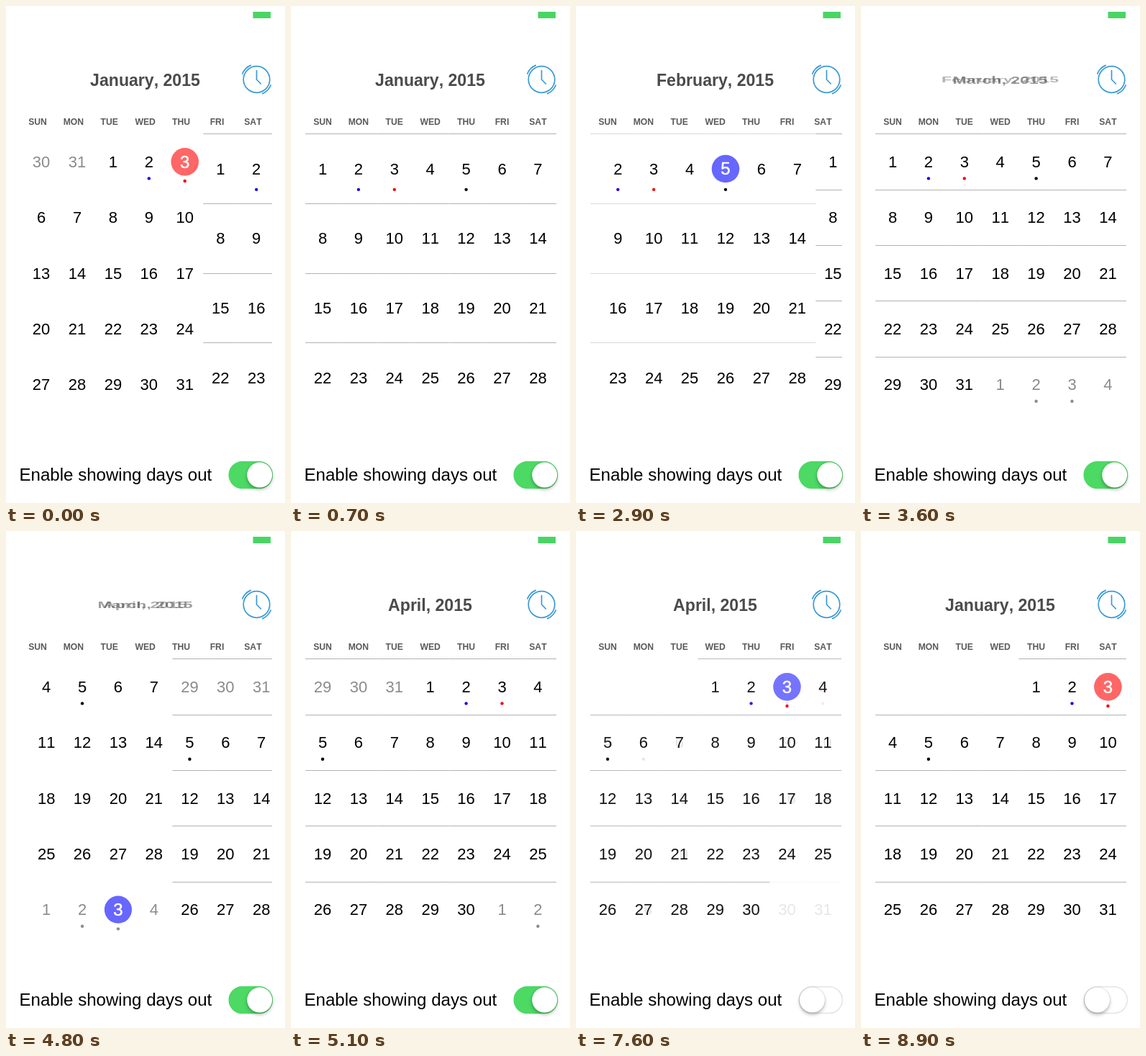
Recreate the animation shown at these times as an HTML page. Size 388 px wide and 690 px high, loop 9 s.

```html
<!DOCTYPE html>
<html lang="en">
<head>
<meta charset="utf-8">
<title>Calendar</title>
<style>
html, body { margin: 0; width: 100%; height: 100%; overflow: hidden; background: #fff; }
svg { display: block; width: 388px; height: 690px; font-family: "Liberation Sans", Arial, sans-serif; font-kerning: none; }
.day { font-size: 22px; text-anchor: middle; }
.picked { font-size: 24px; fill: #fff; stroke: #fff; stroke-width: .5; }
.week { font-size: 12.2px; font-weight: bold; fill: #5a5a5a; text-anchor: middle; }
.title { font-size: 23.1px; font-weight: bold; fill: #4b4b4b; text-anchor: middle; }
.line { stroke: #b2b2b2; stroke-width: 1; }
#clock { fill: none; stroke: #3b9ad6; stroke-width: 1.7; stroke-linecap: round; }
#knob { filter: drop-shadow(0 3px 2.5px rgba(0,0,0,.22)) drop-shadow(0 0 1px rgba(0,0,0,.2)); }
</style>
</head>
<body>
<svg id="stage" viewBox="0 0 388 690">
  <clipPath id="view"><rect x="20" y="170" width="350" height="400"/></clipPath>
  <rect x="343.5" y="8" width="24.5" height="9" fill="#49d564"/>
  <g id="clock">
    <circle cx="348.5" cy="102" r="18.3"/>
    <path d="M348.5 89.5V102L354.3 108M328.8 94A21.4 21.4 0 0 1 340.2 82.4M368.2 110A21.4 21.4 0 0 1 356.8 121.6"/>
  </g>
  <g id="head"></g>
  <g id="pages" clip-path="url(#view)"></g>
  <text x="18.5" y="659" font-size="24.08">Enable showing days out</text>
  <rect id="track" x="310.2" y="632.7" width="60.2" height="36.8" rx="18.4" stroke-width="1.5"/>
  <rect id="knob" y="633.6" height="35" rx="17.5" fill="#fff"/>
</svg>
<script>
const LOOP = 9000, PAGE = 349, COL = PAGE / 7, TOP = 177.8, GRID = 386.6;
const $ = id => document.getElementById(id);

function add(parent, tag, attrs, text) {
  const el = document.createElementNS("http://www.w3.org/2000/svg", tag);
  for (const k in attrs) el.setAttribute(k, attrs[k]);
  if (text !== undefined) el.textContent = text;
  parent.appendChild(el);
  return el;
}
const set = (el, attrs) => { for (const k in attrs) el.setAttribute(k, attrs[k]); };

// Timing helpers
const ramp = (t, a, b) => Math.min(1, Math.max(0, (t - a) / (b - a)));
const mix = (a, b, p) => a + (b - a) * p;
const blend = (a, b, p) => `rgb(${a.map((v, i) => Math.round(mix(v, b[i], p)))})`;
function bezier(x1, y1, x2, y2) {
  const at = (a, b, s) => 3 * a * s * (1 - s) ** 2 + 3 * b * s * s * (1 - s) + s ** 3;
  return x => {
    if (x <= 0 || x >= 1) return x <= 0 ? 0 : 1;
    let lo = 0, hi = 1;
    for (let i = 0; i < 24; i++) {
      const mid = (lo + hi) / 2;
      if (at(x1, x2, mid) < x) lo = mid; else hi = mid;
    }
    return at(y1, y2, lo);
  };
}
const swipe = bezier(.25, .2, .25, 1);
const easeIn = bezier(.42, 0, 1, 1);
const easeInOut = bezier(.42, 0, .58, 1);
const spring = x => x >= 1 ? 1 : 1 - .9 * Math.exp(-5 * x) * Math.cos(8 * x);

const DOTS = { 2: "#1a00e6", 3: "#f40000", 5: "#000" };

// One month page: lead = weekday of the 1st, pick = index of the selectable cell
function month(lead, days, before, pick, today) {
  const root = add($("pages"), "g", {});
  const lines = add(root, "g", {});
  const outs = [], rows = Math.ceil((lead + days) / 7), rowH = GRID / rows;
  const page = { root, lines, outs };
  for (let i = 0; i < rows * 7; i++) {
    const n = i - lead + 1, out = n < 1 || n > days;
    const num = n < 1 ? n + before : n > days ? n - days : n;
    const col = i % 7, row = Math.floor(i / 7);
    const x = 44 + 49.9 * col, y = TOP + (row + .5) * rowH;
    const cell = add(root, "g", {});
    const ly = Math.floor(TOP + row * rowH) + .5;
    const line = add(lines, "line", { class: "line", x1: 20 + COL * col, x2: 20 + COL * (col + 1), y1: ly, y2: ly });
    if (out) outs.push(cell, line);
    const fill = out ? "#8c8c8c" : "#000";
    if (i === pick) {
      page.disc = add(cell, "circle", { cx: x, cy: y - .1, fill: today ? "#ff6666" : "#6766ff" });
      page.plain = today ? "#f00000" : fill;
    }
    const label = add(cell, "text", { class: "day", x, y: y + 7.6, fill }, num);
    const dotY = y + rowH * .297;
    const dot = DOTS[num] && add(cell, "circle", { cx: x, cy: dotY, r: 2.2, fill: out ? "#8c8c8c" : DOTS[num] });
    if (i === pick) Object.assign(page, { label, dot, y, dotY });
  }
  return page;
}

function showPick(page, t, start) {
  const on = t >= start;
  set(page.disc, { r: on ? 19.3 * spring((t - start) / 450) : 0 });
  set(page.label, { class: on ? "day picked" : "day", fill: on ? "#fff" : page.plain, y: page.y + (on ? 8.2 : 7.6) });
  set(page.dot, { cy: on ? Math.max(page.dotY, page.y + 26.6) : page.dotY });
}

const jan = month(4, 31, 31, 6, true);
const feb = month(0, 28, 31, 4);
const mar = month(0, 31, 28, 33);
const apr = month(3, 30, 31, 5);
const pages = [jan, feb, mar, apr];

["SUN", "MON", "TUE", "WED", "THU", "FRI", "SAT"].forEach((d, i) =>
  add($("head"), "text", { class: "week", x: 44 + 49.9 * i, y: 165 }, d));

const names = ["January", "February", "March", "April", "January"];
const turns = [960, 3350, 4580, 8350];
const titles = names.map(n => add($("head"), "text", { class: "title", y: 8.3 }, n + ", 2015"));

function drawTitles(t) {
  const turn = i => easeIn(ramp(t, turns[i], turns[i] + 350));
  titles.forEach((el, i) => {
    const shown = i ? turn(i - 1) : 1, gone = i < turns.length ? turn(i) : 0;
    set(el, {
      opacity: shown * (1 - gone),
      transform: `translate(193.5 102.5) scale(1 ${mix(.1, 1, shown * (1 - gone))})`
    });
  });
}

function drawPages(t) {
  const scroll = swipe(ramp(t, -135, 665)) + swipe(ramp(t, 2850, 3450)) + easeInOut(ramp(t, 4582, 5082));
  const fade = easeInOut(ramp(t, 7430, 8230));
  const late = t > 7000;
  pages.forEach((p, i) => {
    const x = p === jan && late ? 0 : (i - scroll) * PAGE;
    const alpha = late ? (p === jan ? fade : p === apr ? 1 - fade : 0) : 1;
    set(p.root, {
      transform: `translate(${x} 0)`, opacity: alpha,
      display: Math.abs(x) < PAGE && alpha > 0 ? "inline" : "none"
    });
  });
  // Row lines of the leaving page are hidden while it moves
  set(jan.lines, { opacity: late ? 1 : 0 });
  set(feb.lines, { opacity: 1 - ramp(t, 2850, 2950) });
  set(mar.lines, { opacity: t < 4582 ? 1 : 0 });

  const outAlpha = 1 - ramp(t, 6200, 6500);
  for (const p of pages) for (const el of p.outs) set(el, { opacity: outAlpha });

  showPick(jan, t, late ? 8230 : -1000);
  showPick(feb, t, 1450);
  showPick(mar, t, 4520);
  showPick(apr, t, 5230);
}

function drawSwitch(t) {
  const p = easeInOut(ramp(t, 5980, 6220));
  const w = 35 + 4.5 * (ramp(t, 5850, 5980) - ramp(t, 6220, 6400));
  set($("knob"), { x: mix(370.2 - w, 311, p), width: w });
  set($("track"), {
    fill: blend([76, 217, 100], [255, 255, 255], p),
    stroke: blend([76, 217, 100], [228, 228, 228], p)
  });
}

function draw(t) {
  drawTitles(t);
  drawPages(t);
  drawSwitch(t);
  set($("clock"), { opacity: t >= 7000 && t < 7450 ? .4 : 1 });
}

const began = performance.now();
function tick() {
  draw((performance.now() - began) % LOOP);
  requestAnimationFrame(tick);
}
tick();
</script>
</body>
</html>
```
